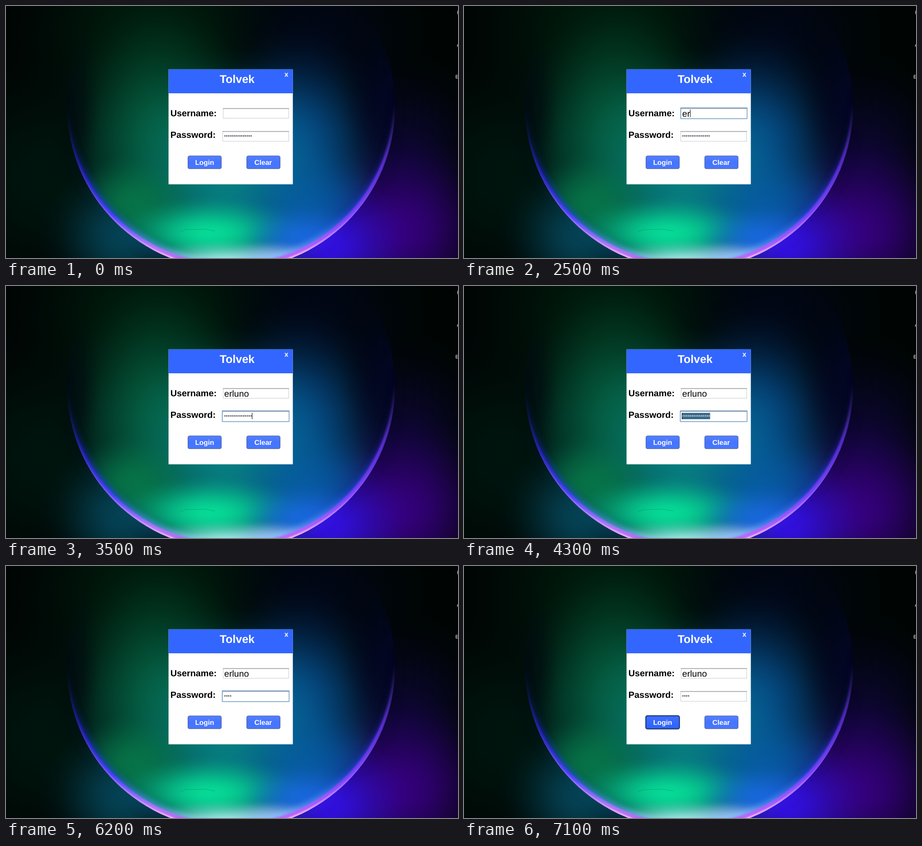
An HTML page with a canvas for the animation above (8000 ms loop, 1000 by 560 pixels).

```html
<!DOCTYPE html>
<html lang="en">
<head>
<meta charset="utf-8">
<title>Login</title>
<style>
  html, body { margin: 0; width: 100%; height: 100%; overflow: hidden; background: #000; }
  canvas, svg { position: absolute; left: 0; top: 0; }
  text { font-family: "Liberation Sans", Arial, sans-serif; text-rendering: geometricPrecision; white-space: pre; }
  .bold { font-weight: bold; }
  .white { fill: #fff; }
  .mid { text-anchor: middle; }
  .ring { fill: #73a4d1; visibility: hidden; }
</style>
</head>
<body>
<canvas id="bg" width="1000" height="560"></canvas>
<svg width="1000" height="560" viewBox="0 0 1000 560">
  <defs>
    <linearGradient id="up" x2="0" y2="1"><stop stop-color="#5480ff"/><stop offset=".5" stop-color="#4574ff"/><stop offset="1" stop-color="#4877ff"/></linearGradient>
    <linearGradient id="hover" x2="0" y2="1"><stop stop-color="#658dff"/><stop offset="1" stop-color="#5983ff"/></linearGradient>
    <linearGradient id="down" x2="0" y2="1"><stop stop-color="#3d6eff"/><stop offset="1" stop-color="#2f62fb"/></linearGradient>
  </defs>
  <g class="white" font-size="11">
    <text x="998" y="18">I</text><text x="997.5" y="90">A</text><text x="994.3" y="161">E</text>
  </g>
  <path d="M359.6 140.7h275v255.5h-275z" fill="#fff"/>
  <path d="M359.6 140.7h275v53.3h-275z" fill="#36f"/>
  <text class="bold white mid" x="511.3" y="171" font-size="25">Tolvek</text>
  <text class="bold white" x="616" y="157" font-size="15.5">x</text>
  <g class="bold" font-size="19.8">
    <text x="363.8" y="245">Username:</text>
    <text x="363.8" y="293">Password:</text>
  </g>

  <rect class="ring" id="userRing" x="478.6" y="225.6" width="148.6" height="25.6" rx="1"/>
  <path d="M480 227h146v23h-146z" fill="#c9cacc"/>
  <path d="M480 227h146v1.4h-146z" fill="#8d8f93"/>
  <path d="M481 228.5h144v20.5h-144z" fill="#fff"/>
  <path d="M481 228.5h144v1h-144z" fill="#e3e4e6"/>
  <text id="user" x="482.7" y="245.5" font-size="19.7"></text>

  <rect class="ring" id="passRing" x="477.6" y="276.6" width="149.6" height="25.6" rx="1"/>
  <path d="M479 278h147v23h-147z" fill="#c9cacc"/>
  <path d="M479 278h147v1.4h-147z" fill="#8d8f93"/>
  <path d="M480 279.5h145v20.5h-145z" fill="#fff"/>
  <path d="M480 279.5h145v1h-145z" fill="#e3e4e6"/>
  <path id="mark" d="M482 282h62.5v14h-62.5z" fill="#39698a"/>
  <text id="pass" x="482.3" y="294" font-size="10.64"></text>
  <rect id="caret" width="1"/>

  <rect class="ring" id="loginRing" x="400.6" y="331.3" width="77.4" height="32.2" rx="5"/>
  <rect id="login" x="402.5" y="333" width="74" height="28.7" rx="3.5"/>
  <rect x="532.5" y="333" width="74" height="28.7" rx="3.5" fill="url(#up)" stroke="#4b5a86"/>
  <g class="bold white mid" font-size="15.5">
    <text x="439.5" y="353">Login</text>
    <text x="569" y="353">Clear</text>
  </g>
</svg>
<script>
const $ = id => document.getElementById(id);
const c = $('bg').getContext('2d');
const CX = 498, CY = 223, R = 363;

// Soft elliptical glow with a bell-shaped falloff.
function glow(x, y, rx, ry, color, alpha = 1) {
  const g = c.createRadialGradient(0, 0, 0, 0, 0, 1);
  for (let i = 0; i <= 10; i++) {
    const a = alpha * (Math.cos(Math.PI * i / 10) + 1) / 2;
    g.addColorStop(i / 10, color + Math.round(a * 255).toString(16).padStart(2, '0'));
  }
  c.save();
  c.translate(x, y);
  c.scale(rx, ry);
  c.fillStyle = g;
  c.fillRect(-1, -1, 2, 2);
  c.restore();
}

function fade(x0, y0, x1, y1, colors) {
  const g = c.createLinearGradient(x0, y0, x1, y1);
  colors.forEach((k, i) => g.addColorStop(i / (colors.length - 1), k));
  return g;
}

// Crescent along the lower edge of the globe.
function rim(lift, inset, blur, style) {
  c.save();
  c.filter = `blur(${blur}px)`;
  c.fillStyle = style;
  c.beginPath();
  c.arc(CX, CY, R, 0, 7);
  c.arc(CX, CY - lift, R - inset, 0, 7);
  c.fill('evenodd');
  c.restore();
}

const down = colors => fade(0, 180, 0, 560, colors);

function paintBackground() {
  c.fillStyle = '#000504';
  c.fillRect(0, 0, 1000, 560);
  glow(330, 60, 360, 300, '#001c0d');
  glow(90, 380, 300, 300, '#00160f', .9);
  glow(260, 510, 190, 180, '#05485c', .9);
  glow(690, 70, 260, 240, '#010719', .8);
  glow(890, 340, 190, 240, '#0b0630', .9);
  glow(870, 500, 250, 230, '#360080', .95);
  glow(710, 530, 200, 180, '#3410e8', .95);
  rim(20, -14, 12, down(['#0000', '#0000', '#1020a030', '#2040c870', '#3c70f8e0']));

  c.save();
  c.beginPath();
  c.arc(CX, CY, R, 0, 7);
  c.clip();
  glow(500, 420, 440, 330, '#03283a', .9);
  glow(340, 290, 250, 320, '#046040', .95);
  glow(640, 320, 230, 290, '#055094', .95);
  glow(490, 390, 260, 300, '#078486', .9);
  glow(670, 450, 200, 150, '#0660ac', .75);
  glow(280, 440, 160, 120, '#078048', .75);
  glow(450, 505, 230, 90, '#06e098', .95);
  glow(660, 520, 160, 90, '#1a6ce8', .85);
  glow(490, 576, 230, 62, '#b0fff6');
  glow(600, 566, 130, 50, '#a4c0ff', .8);
  glow(140, 240, 75, 230, '#010d10', .9);
  glow(850, 210, 120, 230, '#020624', .85);
  rim(14, 6, 6, down(['#0000', '#0a1c5c40', '#1424b0a0', '#2048e8b0', '#88c8ff90']));
  rim(9, 3, 1.5, down(['#0000', '#10186070', '#2620c8d0', '#4a40ff', '#d498f8']));
  rim(9, 4, 2, fade(500, 300, 640, 560, ['#a040ff00', '#a040ff00', '#8a38f0a0', '#a848ff90']));
  rim(3, 1, .8, down(['#0000', '#20286020', '#5038d0a0', '#a868ffd0', '#ffb4f8']));
  c.strokeStyle = '#04905c90';
  c.stroke(new Path2D('M385 502l10-5 45-1 22 4'));
  c.restore();
}

const NAME = 'erluno';
const nameKeys = [2300, 2500, 2700, 2800, 3000, 3100];
const passKeys = [5000, 5200, 5500, 5800];
const caretFlips = [1300, 1800, 2300, 3900, 4300, 4700, 5000, 6200, 6700, 7100];
const advance = [0, .556, .889, 1.111, 1.667, 2.223, 2.779];
const passed = (list, t) => list.filter(s => t >= s).length;
const show = (id, on) => $(id).style.visibility = on ? 'visible' : 'hidden';
const set = (id, attrs) => Object.entries(attrs).forEach(([k, v]) => $(id).setAttribute(k, v));

function draw(t) {
  const typed = passed(nameKeys, t);
  const stars = t < 5000 ? 15 : passed(passKeys, t);
  const selected = t >= 4300 && t < 5000;
  const inUser = t >= 1300 && t < 3500;
  const inPass = t >= 3500 && t < 7100;
  const pressed = t >= 7100;

  $('user').textContent = NAME.slice(0, typed);
  $('pass').textContent = '*'.repeat(stars);
  set('pass', { fill: selected ? '#fff' : '#101020' });
  show('mark', selected);
  show('userRing', inUser);
  show('passRing', inPass);
  show('loginRing', pressed);

  show('caret', passed(caretFlips, t) % 2);
  set('caret', inUser
    ? { x: Math.floor(483.1 + advance[typed] * 19.7), y: 230, height: 17 }
    : { x: selected ? 482 : Math.floor(482.6 + stars * 4.14), y: 282, height: 14 });

  const look = pressed ? 'down' : t >= 6700 ? 'hover' : 'up';
  set('login', { fill: `url(#${look})`, stroke: pressed ? '#14224e' : '#4b5a86', 'stroke-width': pressed ? 1.5 : 1 });
}

paintBackground();
const start = performance.now();
(function loop() {
  draw((performance.now() - start) % 8000);
  requestAnimationFrame(loop);
})();
</script>
</body>
</html>
```
